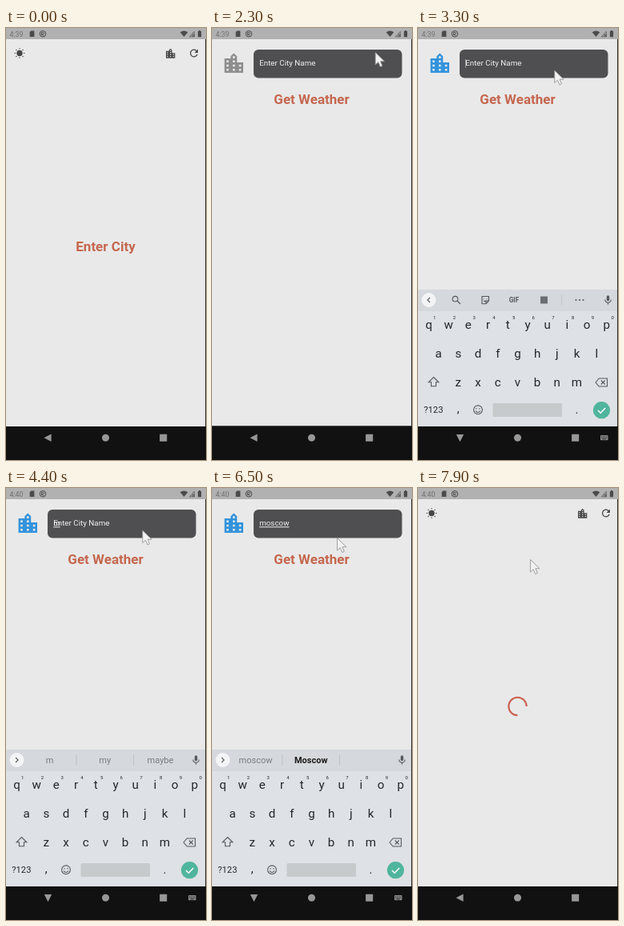
Animation of 250x540 px, one loop 8000 ms. Source, as an HTML page:

```html
<!DOCTYPE html>
<html lang="en">
<head>
<meta charset="utf-8">
<title>Weather app</title>
<style>
  html, body { margin: 0; width: 100%; height: 100%; overflow: hidden; background: #e9e9e9; }
  svg { display: block; font-family: Roboto, sans-serif; }
  .title { font-size: 17px; font-weight: 700; fill: #c5674f; text-anchor: middle; }
  .field { font-size: 9.8px; fill: #f2f2f2; }
  .mid { text-anchor: middle; }
  .line { fill: none; stroke: #555a5e; stroke-width: 1.1; }
</style>
</head>
<body>
<svg width="250" height="540" viewBox="0 0 250 540">
  <defs>
    <path id="city" d="M15 11V5l-3-3-3 3v2H3v14h18V11h-6zm-8 8H5v-2h2v2zm0-4H5v-2h2v2zm0-4H5V9h2v2zm6 8h-2v-2h2v2zm0-4h-2v-2h2v2zm0-4h-2V9h2v2zm0-4h-2V5h2v2zm6 12h-2v-2h2v2zm0-4h-2v-2h2v2z"/>
    <clipPath id="buttonClip"><rect x="72" y="75" width="105" height="29" rx="2"/></clipPath>
  </defs>

  <rect width="250" height="540" fill="#e9e9e9"/>
  <rect y="498" width="250" height="42" fill="#111"/>

  <g id="statusBar" fill="#4b4b4b">
    <rect width="250" height="14" fill="#b1b1b1"/>
    <text id="clock" x="4.5" y="10.5" font-size="8.8" fill="#707070"></text>
    <path d="M31.4 3.4h4v7.6h-5.7V5.1z"/>
    <circle cx="46" cy="7.3" r="3.8" fill="none" stroke="#4b4b4b"/>
    <path d="M44.4 9.2V5.5h2.2a1.1 1.1 0 0 1 0 2.2h-2l3 2.3" fill="none" stroke="#4b4b4b" stroke-width=".9"/>
    <path d="M217.7 5.2q4.8-3.4 9.6 0l-4.8 5.8z"/>
    <path d="M229 11l6.5-7v7z" fill="#8d8d8d" stroke="#666" stroke-width=".6"/>
    <path d="M233 8l3 3m0-3l-3 3" stroke="#4b4b4b"/>
    <path d="M239.9 4h1.1v-.9h2V4h1.1v7.3h-4.2z"/>
  </g>

  <g id="home" fill="#464646">
    <circle cx="17" cy="31.5" r="3.7"/>
    <circle cx="17" cy="31.5" r="5.7" fill="none" stroke="#464646" stroke-width="1.5" pathLength="24" stroke-dasharray=".7 2.3" stroke-dashoffset=".35"/>
    <use href="#city" transform="translate(198.1 24.4) scale(.63)"/>
    <path transform="translate(227.5 24.1) scale(.62)" d="M17.65 6.35C16.2 4.9 14.21 4 12 4c-4.42 0-7.99 3.58-7.99 8s3.57 8 7.99 8c3.73 0 6.84-2.55 7.73-6h-2.08c-.82 2.33-3.04 4-5.65 4-3.31 0-6-2.69-6-6s2.69-6 6-6c1.66 0 3.14.69 4.22 1.78L13 11h7V4l-2.35 2.35z"/>
    <g id="prompt">
      <text class="title" x="124.5" y="278.7">Enter City</text>
      <rect y="497" width="250" height="1" fill="#f4f4f4"/>
    </g>
    <circle id="spinner" cx="124.5" cy="273" r="11.2" fill="none" stroke="#cb604f" stroke-width="2.1" pathLength="360"/>
  </g>

  <g id="search">
    <rect y="497" width="250" height="1" fill="#555"/>
    <use id="cityIcon" href="#city" transform="translate(11.7 28.8) scale(1.3)"/>
    <rect x="52" y="27" width="185.5" height="35.5" rx="6" fill="#4f4e50"/>
    <text id="placeholder" class="field" x="59.2" y="47.3">Enter City Name</text>
    <text id="typed" class="field" x="59.2" y="47.3" text-decoration="underline"></text>
    <rect id="caret" x="59" y="39" width="1" height="10.5" fill="#999"/>
    <g id="press" clip-path="url(#buttonClip)">
      <rect x="72" y="75" width="105" height="29" fill="#b9deef" opacity=".2"/>
      <circle id="ripple" cx="138" cy="89.5" fill="#a5cdea" opacity=".45"/>
    </g>
    <text class="title" x="124.5" y="95.2">Get Weather</text>
  </g>

  <g id="keyboard" fill="#24282b">
    <rect y="327" width="250" height="171" fill="#dee1e5"/>
    <rect y="327" width="250" height="27" fill="#d5d8dc"/>
    <circle cx="13.5" cy="340" r="9" fill="#f3f4f5"/>
    <path id="chevron" class="line" d="M-1.4-3l3 3l-3 3"/>
    <g id="tools" class="line">
      <circle cx="46.5" cy="338.7" r="3.3"/>
      <path d="M49 341l4 4"/>
      <path d="M80 335.5h8.5v5.5l-3.5 3.7h-5zM88.5 341H85v3.7M82 338.5v.8m4-.8v.8m-4 1.5q1.5 1.5 3 .2"/>
      <text x="120" y="343" class="mid" font-size="8.2" font-weight="700" fill="#555a5e" stroke="none">GIF</text>
      <rect x="153" y="335.5" width="9" height="9" fill="#6a6f73" stroke="none"/>
      <path d="M179.5 333v14" stroke="#c3c6ca"/>
      <path d="M197.5 340h10" stroke-width="2.2" stroke-linecap="round" stroke-dasharray="0 4.5"/>
    </g>
    <g id="suggestions" class="mid" font-size="11" fill="#787c80">
      <path d="M88 333v14M159.5 333v14" stroke="#bfc2c6"/>
      <text x="54.5" y="344"></text>
      <text x="123.7" y="344"></text>
      <text x="193" y="344"></text>
    </g>
    <rect x="235.8" y="334.3" width="3.4" height="7" rx="1.7" fill="#555a5e"/>
    <path class="line" d="M233.8 339.5a3.7 3.7 0 0 0 7.4 0M237.5 343.2v2.5"/>
    <g id="keys" class="mid"></g>
    <path class="line" d="M19.5 436.5l6.3 6.3h-3.3v5h-6v-5h-3.3z"/>
    <path class="line" d="M222 443l4.2-5h10.3v10h-10.3zM228.8 440.5l5 5m0-5l-5 5"/>
    <text x="7.3" y="481.3" font-size="11.2">?123</text>
    <circle class="line" cx="75" cy="477.3" r="5.4"/>
    <path class="line" d="M73 475v1.5m4-1.5v1.5m-5 2.2q3 3.5 6 0"/>
    <rect x="93.5" y="469" width="86.5" height="17" rx="1.5" fill="#c7cacd"/>
    <circle cx="229.5" cy="477.7" r="10.6" fill="#50b59d"/>
    <path d="M225 478l3.2 3.2l6-6.3" fill="none" stroke="#fff" stroke-width="1.5"/>
  </g>

  <g id="navBar" fill="#979797">
    <path id="back" d="M-5 0L4.1-4.7V4.7z"/>
    <circle cx="124.5" cy="512.2" r="4.5"/>
    <rect x="192.1" y="507.7" width="9.1" height="9.1" rx=".6"/>
    <g id="imeSwitch">
      <rect x="228" y="509" width="9.5" height="6.3" rx=".7" fill="#8c8c8c"/>
      <path d="M229 510.8h7.5M229 512.4h7.5" stroke="#111" stroke-width=".8" stroke-dasharray=".9 .7"/>
      <path d="M230.5 514h4.5" stroke="#111" stroke-width=".7"/>
    </g>
  </g>

  <rect x="249" y="14" width="1" height="484" fill="#333"/>
  <path id="pointer" d="M0 0V15.5L3.7 12.2L6.2 18L8.8 16.8L6.4 11.2H11.4Z" fill="#f2f2f2" stroke="#8c8c8c" stroke-width=".8" stroke-linejoin="round"/>
</svg>

<script>
const LOOP = 8000, STEP = 100;
const $ = id => document.getElementById(id);
const show = (id, on) => $(id).style.display = on ? '' : 'none';
const set = (id, attrs) => Object.entries(attrs).forEach(([k, v]) => $(id).setAttribute(k, v));
const ramp = (t, from, to) => Math.min(1, Math.max(0, (t - from) / (to - from)));
const smooth = p => p * p * (3 - 2 * p);

// time, x, y of the pointer tip
const pointerPath = [
  [600, 143.5, 193.5], [700, 143.5, 193.5], [1600, 203.5, 32.5], [1900, 203.5, 32.5],
  [2000, 204.2, 30.5], [2500, 204.2, 30.5], [2800, 170.7, 53], [6400, 170.7, 53],
  [6500, 156.5, 62.5], [6600, 143.5, 76.5], [6700, 143.5, 76.5], [6900, 140.5, 89.5], [LOOP, 140.5, 89.5]
];

// time, typed text, middle and right suggestion
const typing = [
  [0, '', '', ''], [4300, 'm', 'my', 'maybe'], [5000, 'mo', 'more', 'morning'],
  [5200, 'mos', 'most', 'mostly'], [5300, 'mosc', 'Moscow', ''],
  [5400, 'mosco', 'Moscow', ''], [5900, 'moscow', 'Moscow', '']
];

function buildKeys() {
  const key = (x, y, size, label) => `<text x="${x}" y="${y}" font-size="${size}">${label}</text>`;
  const rows = [['qwertyuiop', 13.5, 376.3], ['asdfghjkl', 25.7, 412], ['zxcvbnm', 50.3, 447.5]];
  let out = key(50.3, 481, 15, ',') + key(198.5, 481.5, 15, '.');
  rows.forEach(([letters, x, y], row) => [...letters].forEach((c, i) => {
    out += key(x + 24.7 * i, y, 15.2, c);
    if (!row) out += key(x + 24.7 * i + 7.3, 364, 6, (i + 1) % 10);
  }));
  $('keys').innerHTML = out;
}

function pointerAt(t) {
  const i = Math.max(1, pointerPath.findIndex(k => k[0] > t));
  const [t0, x0, y0] = pointerPath[i - 1], [t1, x1, y1] = pointerPath[i];
  const p = smooth(ramp(t, t0, t1));
  return `translate(${x0 + (x1 - x0) * p} ${y0 + (y1 - y0) * p})`;
}

function drawKeyboard(t, text, middle, right) {
  const opening = ramp(t, 3040, 3300), closing = ramp(t, 7230, 7430);
  const visible = opening > 0 && closing < 1;
  show('keyboard', visible);
  set('keyboard', {
    transform: `translate(0 ${19 * (1 - opening) ** 2 + 19 * closing})`,
    opacity: Math.min(opening, 1 - closing ** 2)
  });
  show('tools', !text);
  show('suggestions', text);
  set('chevron', { transform: `translate(13.5 340) scale(${text ? 1 : -1} 1)` });
  const words = $('suggestions').querySelectorAll('text');
  [text, middle, right].forEach((word, i) => words[i].textContent = word);
  const best = middle === 'Moscow';
  words[1].setAttribute('font-weight', best ? 700 : 400);
  words[1].setAttribute('fill', best ? '#1c1c1c' : '#787c80');

  const turn = Math.min(ramp(t, 3000, 3200), 1 - ramp(t, 7200, 7400));
  set('back', { transform: `translate(52.5 512.2) rotate(${-90 * turn})` });
  show('imeSwitch', t >= 3200 && t < 7300);
}

function draw(t) {
  const searching = t >= 2300 && t < 7500;
  const loading = t >= 7500;
  const [, text, middle, right] = typing.filter(k => k[0] <= t).pop();

  $('clock').textContent = t < 4000 ? '4:39' : '4:40';
  show('home', !searching);
  show('search', searching);
  show('prompt', !loading);
  show('spinner', loading);
  const arc = 10 + 260 * smooth(ramp(t, 7450, 7900));
  set('spinner', {
    'stroke-dasharray': `${arc} ${360 - arc}`,
    transform: `rotate(${90 - (7900 - t) * 0.2} 124.5 273)`
  });

  set('cityIcon', { fill: t < 3100 ? '#8e8e8e' : '#3393dc' });
  show('placeholder', t < 4500);
  $('typed').textContent = text;
  show('caret', (t >= 3200 && t < 3600) || (t >= 4100 && t < 4300));
  show('press', t >= 7100);
  set('ripple', { r: 6 + 12 * ramp(t, 7100, 7300) + 30 * ramp(t, 7300, 7500) });

  drawKeyboard(t, text, middle, right);
  show('pointer', t >= 600);
  set('pointer', { transform: pointerAt(t) });
}

function frame(now) {
  draw(Math.floor(now % LOOP / STEP) * STEP);
  requestAnimationFrame(frame);
}

buildKeys();
draw(0);
requestAnimationFrame(frame);
</script>
</body>
</html>
```
